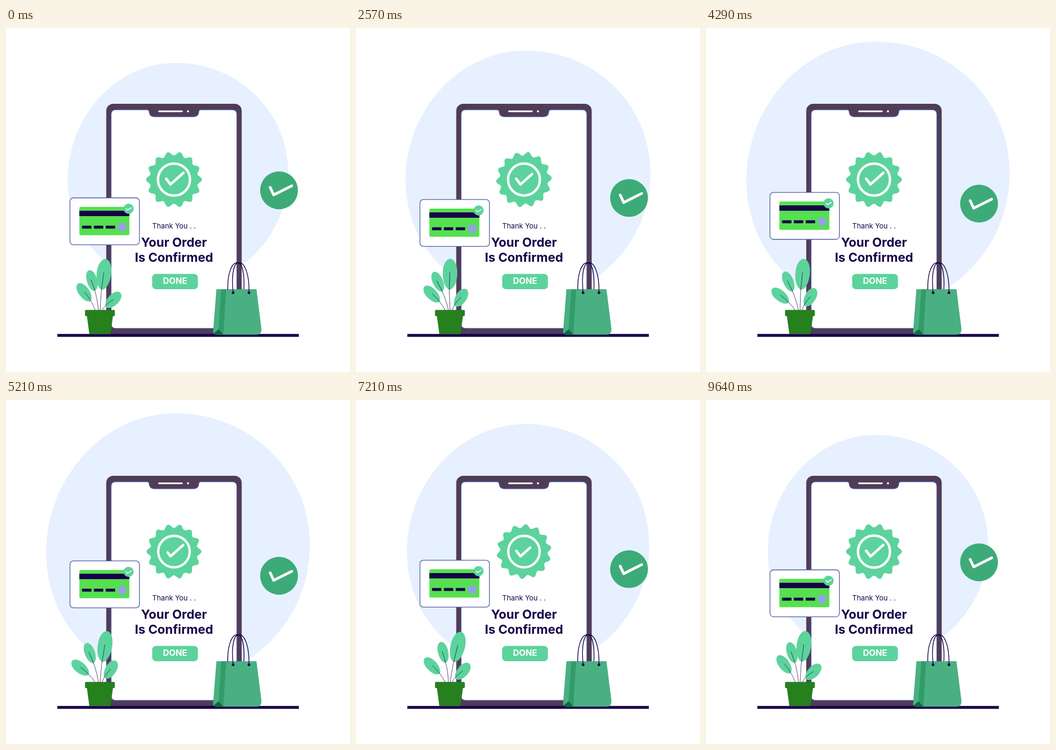
Animation of 640 by 640 pixels, one loop 9.71 s. Source, as an HTML page:

```html
<!DOCTYPE html>
<html lang="en">
<head>
<meta charset="utf-8">
<title>Order confirmed</title>
<style>
html, body { margin: 0; width: 100%; height: 100%; overflow: hidden; background: #fff; }
svg { display: block; width: 100%; height: 100%; }
text { font-family: Inter, "Open Sans", sans-serif; font-weight: 700; text-anchor: middle; fill: #190049; }
.line { fill: none; stroke: #190049; stroke-width: 1.4; }
.tick { fill: none; stroke: #fff; stroke-linecap: round; stroke-linejoin: round; }
.outline { fill: #fff; stroke: #4c5ba3; stroke-width: 1.3; }
.mint { fill: #5cd39c; }
.navy { fill: #190049; }
</style>
</head>
<body>
<svg viewBox="0 0 640 640">
  <path id="blob" fill="#e6f0ff" d="M-205 11C-205-103-117-205-4-205C113-205 205-114 205 0C205 118 110 212-4 212C-116 212-205 126-205 11Z"/>

  <rect x="186.5" y="141" width="252" height="430" rx="13" fill="#503c57"/>
  <path class="outline" d="M204 152H262Q266.500 152 266.500 156.500Q267 165 276 165H349Q358 165 358.500 156.500Q358.500 152 363 152H421Q429.500 152 429.500 160.500V550.500Q429.500 559 421 559H204Q195.500 559 195.500 550.500V160.500Q195.500 152 204 152Z"/>
  <path class="tick" stroke-width="2.8" d="M284.500 155H327.500"/>
  <circle cx="338.500" cy="155" r="1.900" fill="#fff"/>

  <g id="seal">
    <path id="teeth" class="mint"/>
    <circle r="29.800" fill="none" stroke="#fff" stroke-width="4.500"/>
    <path id="sealTick" class="tick" stroke-width="4.800" pathLength="1" d="M-14.500-1.500L-6.500 9L17.500-12.500"/>
  </g>

  <text x="312.500" y="373" font-size="13.200" style="font-weight:400">Thank You . .</text>
  <text x="312.500" y="406.500" font-size="23.200">Your Order</text>
  <text x="312.500" y="434.500" font-size="23.200">Is Confirmed</text>
  <rect class="mint" x="272" y="457.500" width="85" height="28.500" rx="7"/>
  <text x="314.500" y="476.300" font-size="15.800" style="fill:#fff">DONE</text>

  <g id="card">
    <rect class="outline" x="119" y="0" width="129.300" height="87.300" rx="6.500"/>
    <rect x="136.500" y="16.800" width="93" height="52.700" rx="2.500" fill="#55e04f"/>
    <path class="navy" d="M136.500 24H229.500V34H136.500ZM141.500 51.700H159V57.200H141.500ZM163.500 51.700H181V57.200H163.500ZM185.500 51.700H203V57.200H185.500Z"/>
    <circle cx="216" cy="54.300" r="8.500" fill="#91a4dd"/>
    <circle class="mint" cx="228" cy="20.300" r="9.500"/>
    <path class="tick" stroke-width="1.600" d="M223.500 20L225.800 23L233 18.500"/>
  </g>

  <g id="bubble">
    <circle r="35.200" fill="#3dab78"/>
    <path class="tick" stroke-width="5" d="M-16.500-5.500L-10 8.500L23.500-8.300"/>
  </g>

  <g id="plant"></g>
  <path fill="#25801d" d="M149 524.500H200.500Q202.500 524.500 202.500 526.500V534Q202.500 536 200.500 536H199L194.500 569H155L150.500 536H149Q147 536 147 534V526.500Q147 524.500 149 524.500Z"/>

  <rect class="navy" x="95.500" y="569.200" width="449.300" height="5.400"/>

  <path fill="#49b082" d="M391.500 486H466L475.300 560Q475.500 570.500 466 570.500H391Q385 570.500 385.300 564Z"/>
  <path fill="#339b6a" d="M400.500 486H409.500L404.500 570.500L395.500 560.500Z"/>
  <path fill="#0f6a40" d="M386.300 568.500L395.500 560.500L404.500 570.500H391Q388 570.500 386.300 568.500Z"/>
  <path class="line" d="M412.500 487C412 456 420 436.500 430.500 436.500C440 436.500 444 458 442.500 486M422.500 492C419 456 424 436.500 433.500 436.500C445 436.500 453 461 452 492"/>
  <circle class="navy" cx="422.500" cy="492.500" r="2.500"/>
  <circle class="navy" cx="452" cy="492.500" r="2.500"/>
</svg>
<script>
const LOOP = 9710, CYCLE = 9600, TAU = Math.PI * 2;
const el = id => document.getElementById(id);
const set = (node, name, value) => node.setAttribute(name, value);

// Scalloped edge with 14 teeth
let edge = [];
for (let i = 0; i < 280; i++) {
  const a = i / 280 * TAU, r = 48.4 - 3.6 * Math.cos(14 * a);
  edge.push((r * Math.sin(a)).toFixed(2) + ' ' + (-r * Math.cos(a)).toFixed(2));
}
set(el('teeth'), 'd', 'M' + edge.join('L') + 'Z');

// Leaves: centre, tilt, half length, half width, stem, stem base, swing in degrees and phase
const leaves = [
  { x: 182, y: 458.5, tilt: 7, len: 29, wide: 13.5, stem: 'M182 455Q176 490 175 525', base: 175, swing: 6.1, phase: TAU / 4 },
  { x: 160, y: 470, tilt: -16, len: 20, wide: 9.5, stem: 'M158 468Q170 497 172 525', base: 172, swing: 5.7, phase: 1.07 },
  { x: 145.5, y: 492, tilt: -36, len: 20, wide: 10, stem: 'M146 491Q160 508 166 525', base: 168, swing: 7, phase: 0 },
  { x: 199.5, y: 506, tilt: 44, len: 19, wide: 10.3, stem: 'M200 505Q184 515 179 525', base: 178, swing: 8, phase: 0.5 }
];
el('plant').innerHTML = leaves.map(({ x, y, tilt, len: l, wide: w, stem }) => `<g>
  <path class="mint" transform="translate(${x} ${y}) rotate(${tilt})"
    d="M0 ${l}C${-w * .7} ${l * .9} ${-w} ${l * .4} ${-w} ${-l * .1}C${-w} ${-l * .65} ${-w * .5} ${-l} 0 ${-l}C${w * .5} ${-l} ${w} ${-l * .65} ${w} ${-l * .1}C${w} ${l * .4} ${w * .7} ${l * .9} 0 ${l}Z"/>
  <path class="line" style="stroke-width:.7" d="${stem}"/></g>`).join('');
const leafNodes = [...el('plant').children];

function drawSeal(time) {
  const p = time % 5000, shrinkEnd = 1100;
  let scale, turn = 0, from = 0, to = 1;
  if (p < shrinkEnd) {
    from = (1 - Math.cos(p / shrinkEnd * Math.PI)) / 2;
    scale = 1 - 0.19 * from;
  } else {
    const left = Math.max(0, 1 - (p - shrinkEnd) / 2500);
    to = 1 - left ** 3;
    scale = 1 - 0.19 * left ** 4;
    turn = -360 / 7 * left ** 3;
  }
  set(el('seal'), 'transform', `translate(312.5 282) scale(${scale})`);
  set(el('teeth'), 'transform', `rotate(${turn})`);
  set(el('sealTick'), 'stroke-dasharray', `${to - from} 2`);
  set(el('sealTick'), 'stroke-dashoffset', -from);
}

function draw() {
  const time = performance.now() % LOOP;
  const angle = Math.min(time, CYCLE) / CYCLE * TAU;
  const swell = (1 - Math.cos(angle)) / 2;
  set(el('blob'), 'transform', `translate(320 270) scale(${1 + 0.2 * swell})`);
  set(el('bubble'), 'transform', `translate(508 ${302 + 25.5 * swell})`);
  set(el('card'), 'transform', `translate(0 ${309 + 13 * Math.sin(angle + 0.57)})`);
  leaves.forEach(({ base, swing, phase }, i) => {
    const turn = swing * (Math.cos(angle + phase) - Math.cos(phase));
    set(leafNodes[i], 'transform', `rotate(${turn} ${base} 525)`);
  });
  drawSeal(time);
  requestAnimationFrame(draw);
}
draw();
</script>
</body>
</html>
```
